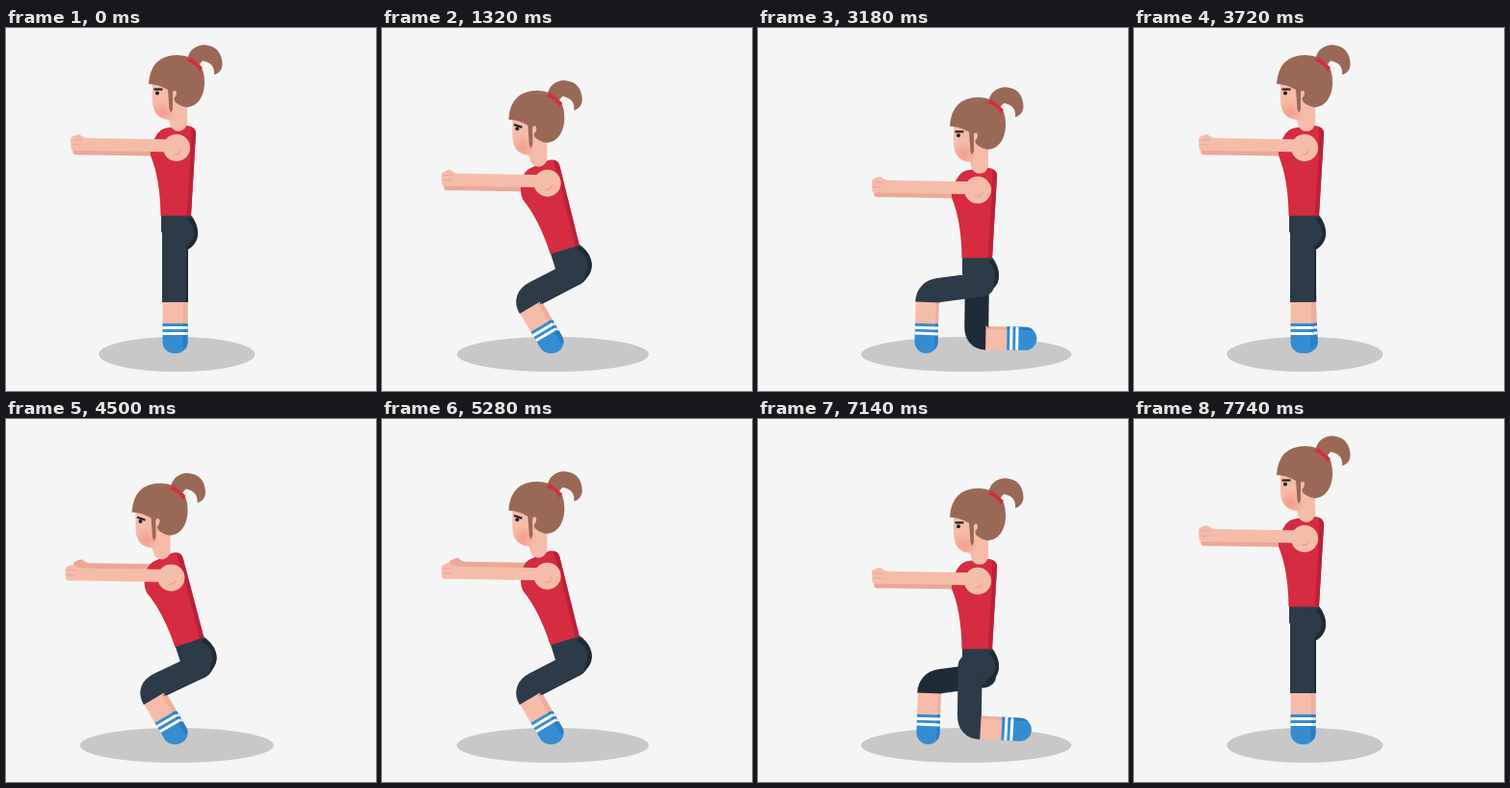
Animation, 384 px wide and 376 px high, one loop 7950 ms. Source, as an HTML page:

```html
<!DOCTYPE html>
<html lang="en">
<head>
<meta charset="utf-8">
<title>Squats and lunges</title>
<style>
  html, body { margin: 0; width: 100%; height: 100%; overflow: hidden; background: #f5f5f5; }
  svg { display: block; width: 384px; height: 376px; }
  .skin { fill: #f6bcaa; }
  .hair { fill: #9a6856; }
  .shirt { fill: #d52c41; }
  .shorts { fill: #2c3b47; }
  .thigh { fill: none; stroke: #2c3b47; stroke-width: 25; stroke-linejoin: round; }
  .far .thigh { stroke: #1e2b37; }
  .far .shorts { fill: #1e2b37; }
</style>
</head>
<body>
<svg viewBox="0 0 384 376">
  <defs>
    <radialGradient id="blush" gradientUnits="userSpaceOnUse" cx="163" cy="87" r="14">
      <stop offset="0" stop-color="#f2806f" stop-opacity=".5"/>
      <stop offset="1" stop-color="#f2806f" stop-opacity="0"/>
    </radialGradient>
    <!-- lower leg, origin at the heel -->
    <g id="calf">
      <path class="skin" d="M-12-46H12V-18H-12Z"/>
      <path d="M9-46H12V-18H9Z" fill="#eeae9b"/>
      <path d="M-12-19H12V0A12 12 0 0 1-12 0Z" fill="#348dd2"/>
      <path d="M9-19H12V0Q12 5 9 8Z" fill="#2a7cc0"/>
      <path d="M-12-16H12V-13H-12ZM-12-10H12V-7H-12Z" fill="#fff"/>
    </g>
    <path id="reach" d="M177 115.500L84 114Q79 113 77 110.500Q74 109.500 70 112Q67 113 67 116L67.500 125Q68 127 71 127H84L177 128.500Z"/>
    <path id="face" d="M152 56V76Q153 94 169 95L170 98A9 9 0 0 0 188 98V70L178 50Z"/>
  </defs>

  <ellipse id="shadow" cy="338" ry="18" fill="#c8c8c8"/>
  <g id="farArm"><use href="#reach" fill="#eba796"/></g>
  <g id="farLeg" class="far"><use href="#calf"/><path class="thigh"/><circle class="shorts" r="12.500"/></g>
  <g id="pelvis">
    <path class="shorts" d="M161 193H191.500Q199 202 199 213A18 18 0 0 1 163 213L161 211Z"/>
    <path d="M190 197Q198 205 197 214T186 229" fill="none" stroke="#1e2b37" stroke-width="4"/>
  </g>
  <g id="nearLeg"><use href="#calf"/><path class="thigh"/><circle class="shorts" r="12.500"/></g>
  <g id="torso">
    <path class="shirt" d="M170 103Q160 103 155 113Q149 122 150 132Q160 156 160.500 194.500H192L197 109Q197 102 188 101Z"/>
    <path d="M192 103Q197 104 197 110L192 194.500H187.500L192 125Z" fill="#bb2139"/>
  </g>
  <g id="head">
    <use href="#face" class="skin"/>
    <use href="#face" fill="url(#blush)"/>
    <circle cx="157" cy="67.500" r="2" fill="#22262c"/>
    <path id="brow" d="M153.500 63.500H162.500" stroke="#22262c" stroke-width="2.200"/>
    <path class="hair" d="M188 33Q191 18 206 17.500Q224 19 224.500 38Q224 46 216 48.500Q217 36 204 34L197 42Z"/>
    <path class="hair" d="M148 58Q150 28 178 28Q206 29 206 56C206 72 198 82 187 82Q180 81 175 76L173 66V84L171 88L169.500 84L168 64Q158 58 148 58Z"/>
    <path d="M173 66Q176 63 177 67Q177 72 173 73Z" class="skin"/>
    <path d="M187 34L191 30L204 41L201 45Q196 36 187 34Z" fill="#d52c41"/>
  </g>
  <g id="nearArm">
    <circle cx="177" cy="124" r="14" class="skin"/>
    <use href="#reach" class="skin"/>
    <path d="M69 116H79M68 121H78" stroke="#eba796" fill="none"/>
    <path d="M182 126Q181 131 174 131" stroke="#eba796" stroke-width="1.500" fill="none"/>
  </g>
</svg>
<script>
const LOOP = 7950, MOVE = 1980;
const GROUND = 325, THIGH = 57, CALF = 52, HEM = 41;
const $ = id => document.getElementById(id);
const shift = (id, x, y) => $(id).setAttribute('transform', `translate(${x} ${y})`);

function ramp(t, from, to) {
  const x = Math.min(1, Math.max(0, (t - from) / (to - from)));
  return x * x * x * (10 - 15 * x + 6 * x * x);
}

function toward(a, b, dist) {
  const k = dist / Math.hypot(b.x - a.x, b.y - a.y);
  return { x: a.x + (b.x - a.x) * k, y: a.y + (b.y - a.y) * k };
}

function drawLeg(id, hip, knee, foot) {
  const above = toward(knee, hip, 12), hem = toward(foot, knee, HEM);
  const turn = Math.atan2(knee.x - foot.x, foot.y - knee.y) * 180 / Math.PI;
  const [calf, thigh, joint] = $(id).children;
  calf.setAttribute('transform', `translate(${foot.x} ${foot.y}) rotate(${turn})`);
  thigh.setAttribute('d',
    `M${hip.x} ${hip.y}L${above.x} ${above.y}Q${knee.x} ${knee.y} ${hem.x} ${hem.y}`);
  joint.setAttribute('transform', `translate(${hip.x} ${hip.y})`);
}

// Planted foot: the hip joint sinks, the knee bends forward
function plantedLeg(id, top, foot, p) {
  const hip = { x: top.x + 8 * p, y: top.y + 11 * p };
  const dx = foot.x - hip.x, dy = foot.y - hip.y, d = Math.hypot(dx, dy);
  const reach = Math.max(1, d / (THIGH + CALF));
  const a = THIGH * reach, b = CALF * reach;
  const along = (a * a - b * b + d * d) / (2 * d);
  const out = Math.sqrt(Math.max(0, a * a - along * along));
  const ux = dx / d, uy = dy / d;
  drawLeg(id, hip, { x: hip.x + ux * along - uy * out, y: hip.y + uy * along + ux * out }, foot);
}

// Trailing leg: upright thigh, the foot slides back
function trailingLeg(id, hip, p, thigh) {
  const knee = { x: hip.x - p, y: hip.y + thigh };
  const calf = 113 - thigh + 3 * p;
  const drop = Math.max(-2, Math.min(calf, GROUND - 10 * Math.sin(Math.PI * p) - knee.y));
  drawLeg(id, hip, knee, { x: knee.x + Math.sqrt(calf * calf - drop * drop), y: knee.y + drop });
}

function pose(t) {
  const n = Math.min(3, Math.floor(t / MOVE)), local = t - n * MOVE;
  const p = ramp(local, 60, 850) - ramp(local, 1010, 1770);
  const squat = n % 2 === 0, second = n > 1;

  const waist = squat ? [20.5 * p, 52.5 * p] : [57 * p, 49 * p];
  const arm = squat ? [-8 * p, 55 * p] : waist;
  const head = squat ? [-25 * p, 55 * p] : waist;
  const lean = squat ? -26 * p : 0;

  const shadow = $('shadow');
  shadow.setAttribute('cx', squat ? 177.3 : 177.3 + 43.4 * p);
  shadow.setAttribute('rx', squat ? 81 + 28 * p : 81 + 31.5 * p);

  for (const id of ['pelvis', 'torso'])
    $(id).setAttribute('transform', `translate(${waist}) rotate(${lean} 176.5 195)`);
  shift('head', ...head);
  const cross = squat && second ? p : 0;
  shift('nearArm', arm[0], arm[1] + 3 * cross);
  shift('farArm', arm[0] + 2 + 9 * cross, arm[1] + 4.5 - 11 * cross);
  $('brow').setAttribute('transform', squat ? `translate(0 ${2 * p}) rotate(${28 * p} 158 63)` : '');

  const r = lean * Math.PI / 180;
  const hx = 176.5 + waist[0] - 1.5 * Math.cos(r) - 17 * Math.sin(r);
  const hy = 195 + waist[1] - 1.5 * Math.sin(r) + 17 * Math.cos(r);
  const near = { x: hx - .5, y: hy }, far = { x: hx + 1.5, y: hy };
  const nearFoot = { x: 174.5, y: GROUND }, farFoot = { x: 176.5, y: GROUND };

  if (squat || !second) plantedLeg('nearLeg', near, nearFoot, p);
  else trailingLeg('nearLeg', { x: near.x - 6 * p, y: near.y }, p, 63);
  if (squat || second) plantedLeg('farLeg', far, farFoot, p);
  else trailingLeg('farLeg', far, p, 65);
}

function frame() {
  pose(performance.now() % LOOP);
  requestAnimationFrame(frame);
}
frame();
</script>
</body>
</html>
```
